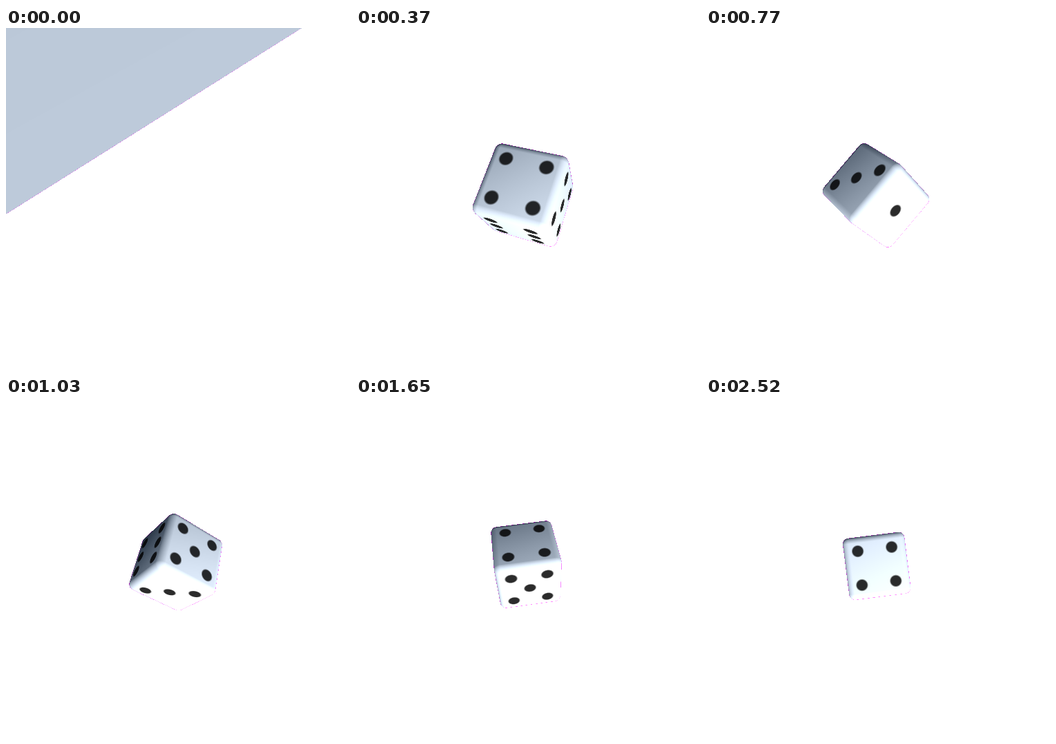
These frames come from a looping animation (498x494 px, 2.56 s). An HTML page with a canvas:

```html
<!DOCTYPE html>
<html lang="en">
<head>
<meta charset="utf-8">
<title>Thrown die</title>
<style>
  html, body { margin: 0; width: 498px; height: 494px; overflow: hidden; background: #fff; }
  canvas { display: block; }
</style>
</head>
<body>
<canvas id="stage" width="498" height="494"></canvas>
<script>
const W = 498, H = 494, CX = 249, CY = 247;
const FOCAL = 475, NEAR = 0.1;
const LOOP = 2560, STEPS = 82, STEP = LOOP / STEPS;
const ROUND = 0.2, CORE = 1 - ROUND;
const PIP_GAP = 0.54, PIP_R = 0.178, PIP_SOFT = 0.022;
const BULGE = 0.18;
const LIGHT = [0.35, 0.7, -0.62];

const ctx = document.getElementById('stage').getContext('2d');
const image = ctx.createImageData(W, H);
const px = image.data;
const mask = new Uint8Array(W * H);

const dot = (a, b) => a[0] * b[0] + a[1] * b[1] + a[2] * b[2];
const cross = (a, b) => [
  a[1] * b[2] - a[2] * b[1],
  a[2] * b[0] - a[0] * b[2],
  a[0] * b[1] - a[1] * b[0]
];
const mul = (a, s) => a.map(v => v * s);
const add = (a, b) => a.map((v, i) => v + b[i]);
const mix = (a, b, s) => a.map((v, i) => v + (b[i] - v) * s);
const unit = a => mul(a, 1 / Math.hypot(...a));

// Body axes point out of the faces six, five and four.
function axes(four, five) {
  const z = unit(four);
  const y = unit(add(five, mul(z, -dot(five, z))));
  return [cross(y, z), y, z];
}

const aim = axes([-0.2185, -0.347, -0.912], [0.9187, 0.2418, -0.3121]);
const hit = axes([-0.193, -0.344, -0.919], [0.926, 0.233, -0.282]);

// step, centre, pose, spin at the start and end of the span (degrees per step)
const keys = [
  [0, [0, 0, 1.1857], aim, 0, 0],
  [3, [0, 0, 3.09], aim, 0.2, 0.2],
  [12, [-0.028, -0.047, 8.9], hit, 0, 0],
  [12.6, [-0.03, -0.05, 9.25], hit, 13.6, 12.2],
  [25, [-0.06, -0.1, 9.75], axes([0.54, 0.475, 0.7], [0.64, -0.76, 0.02]), 12.2, 8.8],
  [33, [-0.055, -0.095, 10.2], axes([0.193, -0.825, 0.53], [0.54, -0.37, -0.75]), 8.8, 3],
  [53, [-0.065, -0.1, 10.75], axes([-0.05, -0.67, -0.74], [0.13, 0.73, -0.67]), 3, 0.5],
  [71, [-0.06, -0.08, 11.15], axes([0, -0.06, -1], [0.125, 0.99, -0.06]), 0.5, 0.2],
  [81, [-0.047, -0.06, 11.38], axes([0.01, 0.015, -1], [0.125, 0.992, 0.015]), 0, 0]
];

// Axis and angle that turn one pose into the next.
function turn(from, to) {
  const sum = from.map((a, i) => cross(a, to[i])).reduce(add);
  const trace = from.reduce((s, a, i) => s + dot(a, to[i]), 0);
  const len = Math.hypot(...sum);
  return {
    axis: len > 1e-6 ? mul(sum, 1 / len) : [1, 0, 0],
    angle: len > 1e-6 ? Math.atan2(len, trace - 1) : 0
  };
}

function rotate(v, axis, angle) {
  const c = Math.cos(angle), s = Math.sin(angle);
  return add(add(mul(v, c), mul(cross(axis, v), s)), mul(axis, dot(axis, v) * (1 - c)));
}

function poseAt(step) {
  let i = 0;
  while (i < keys.length - 2 && step >= keys[i + 1][0]) i++;
  const [k0, from, pose, w0, w1] = keys[i];
  const [k1, to, next] = keys[i + 1];
  const span = k1 - k0, s = (step - k0) / span;
  const { axis, angle } = turn(pose, next);
  const rad = span * Math.PI / 180;
  const a = angle * s * s * (3 - 2 * s)
    + w0 * rad * s * (1 - s) * (1 - s)
    + w1 * rad * s * s * (s - 1);
  return { centre: mix(from, to, s), basis: pose.map(v => rotate(v, axis, a)) };
}

const corners = [[-1, -1], [1, -1], [-1, 1], [1, 1]];
const slash = [[1, -1], [-1, 1]];
const mid = [0, 0];
const pips = {
  1: [mid],
  2: slash,
  3: [...slash, mid],
  4: corners,
  5: [...corners, mid],
  6: [...corners, [-1, 0], [1, 0]]
};
const faces = [[6, 1], [5, 2], [4, 3]];

let basis, eye, light;
const dir = [0, 0, 0], pos = [0, 0, 0], norm = [0, 0, 0];

// Leaves the surface point in pos and its normal in norm.
function cast(x, y) {
  const rx = x - CX, ry = y - CY;
  const inv = 1 / Math.sqrt(rx * rx + ry * ry + FOCAL * FOCAL);
  let tin = -1e9, tout = 1e9;
  for (let i = 0; i < 3; i++) {
    const b = basis[i];
    const d = dir[i] = (rx * b[0] + ry * b[1] + FOCAL * b[2]) * inv || 1e-9;
    const t1 = (-1 - eye[i]) / d, t2 = (1 - eye[i]) / d;
    tin = Math.max(tin, Math.min(t1, t2));
    tout = Math.min(tout, Math.max(t1, t2));
  }
  if (tin > tout || tin * FOCAL * inv < NEAR) return false;
  for (let n = 0, t = tin; n < 32; n++) {
    let sq = 0;
    for (let i = 0; i < 3; i++) {
      const p = pos[i] = eye[i] + dir[i] * t;
      const q = Math.max(Math.abs(p) - CORE, 0);
      norm[i] = p < 0 ? -q : q;
      sq += q * q;
    }
    const gap = Math.sqrt(sq) - ROUND;
    if (gap < 0.002) return true;
    t += gap;
    if (t > tout) return false;
  }
  return true;
}

function pipCover() {
  let f = 0;
  for (let i = 1; i < 3; i++) if (Math.abs(pos[i]) > Math.abs(pos[f])) f = i;
  const a = pos[(f + 1) % 3], b = pos[(f + 2) % 3];
  let best = 9;
  for (const [u, v] of pips[faces[f][pos[f] > 0 ? 0 : 1]]) {
    const du = a - u * PIP_GAP, dv = b - v * PIP_GAP;
    best = Math.min(best, du * du + dv * dv);
  }
  return Math.min(1, Math.max(0, (PIP_R + PIP_SOFT - Math.sqrt(best)) / (2 * PIP_SOFT)));
}

function paint(o) {
  let sq = 0, sum = 0;
  for (let i = 0; i < 3; i++) {
    const n = norm[i] / ROUND + BULGE * pos[i];
    sq += n * n;
    sum += n * light[i];
  }
  const lit = sum / Math.sqrt(sq);
  const tone = 150 + 180 * lit - 35 * lit * lit;
  const ink = 1 - 0.83 * pipCover();
  px[o] = Math.min(255, Math.max(28, tone - 13)) * ink;
  px[o + 1] = Math.min(255, Math.max(38, tone)) * ink;
  px[o + 2] = Math.min(255, Math.max(52, tone + 16)) * ink;
}

// Rim pixels take a magenta tint where they are only partly covered.
function fringe(x, y) {
  let miss = 0;
  for (let i = 0; i < 4; i++) {
    if (!cast(x + (i & 1 ? 0.85 : 0.15), y + (i & 2 ? 0.85 : 0.15))) miss++;
  }
  const m = miss * 0.23, o = (y * W + x) * 4;
  px[o] += (255 - px[o]) * m;
  px[o + 1] *= 1 - m;
  px[o + 2] += (255 - px[o + 2]) * m;
}

function draw(step) {
  const { centre, basis: turned } = poseAt(step), d = centre[2];
  basis = turned;
  eye = basis.map(b => -dot(centre, b));
  light = basis.map(b => dot(b, LIGHT));
  px.fill(255);
  mask.fill(0);
  const reach = d > 3 ? Math.ceil(FOCAL * 1.75 / Math.sqrt(d * d - 2.62)) : W;
  const x0 = Math.max(0, CX - reach), x1 = Math.min(W, CX + reach);
  const y0 = Math.max(0, CY - reach), y1 = Math.min(H, CY + reach);
  for (let y = y0; y < y1; y++) {
    for (let x = x0; x < x1; x++) {
      if (!cast(x + 0.5, y + 0.5)) continue;
      mask[y * W + x] = 1;
      paint((y * W + x) * 4);
    }
  }
  for (let y = Math.max(1, y0); y < Math.min(H - 1, y1); y++) {
    for (let x = Math.max(1, x0); x < Math.min(W - 1, x1); x++) {
      const i = y * W + x;
      if (mask[i] && !(mask[i - 1] && mask[i + 1] && mask[i - W] && mask[i + W])) fringe(x, y);
    }
  }
  ctx.putImageData(image, 0, 0);
}

let shown = -1;
const start = performance.now();
function tick() {
  const t = (performance.now() - start) % LOOP;
  const step = Math.min(STEPS - 1, Math.floor((t + 11) / STEP));
  if (step !== shown) draw(shown = step);
  requestAnimationFrame(tick);
}
tick();
</script>
</body>
</html>
```
